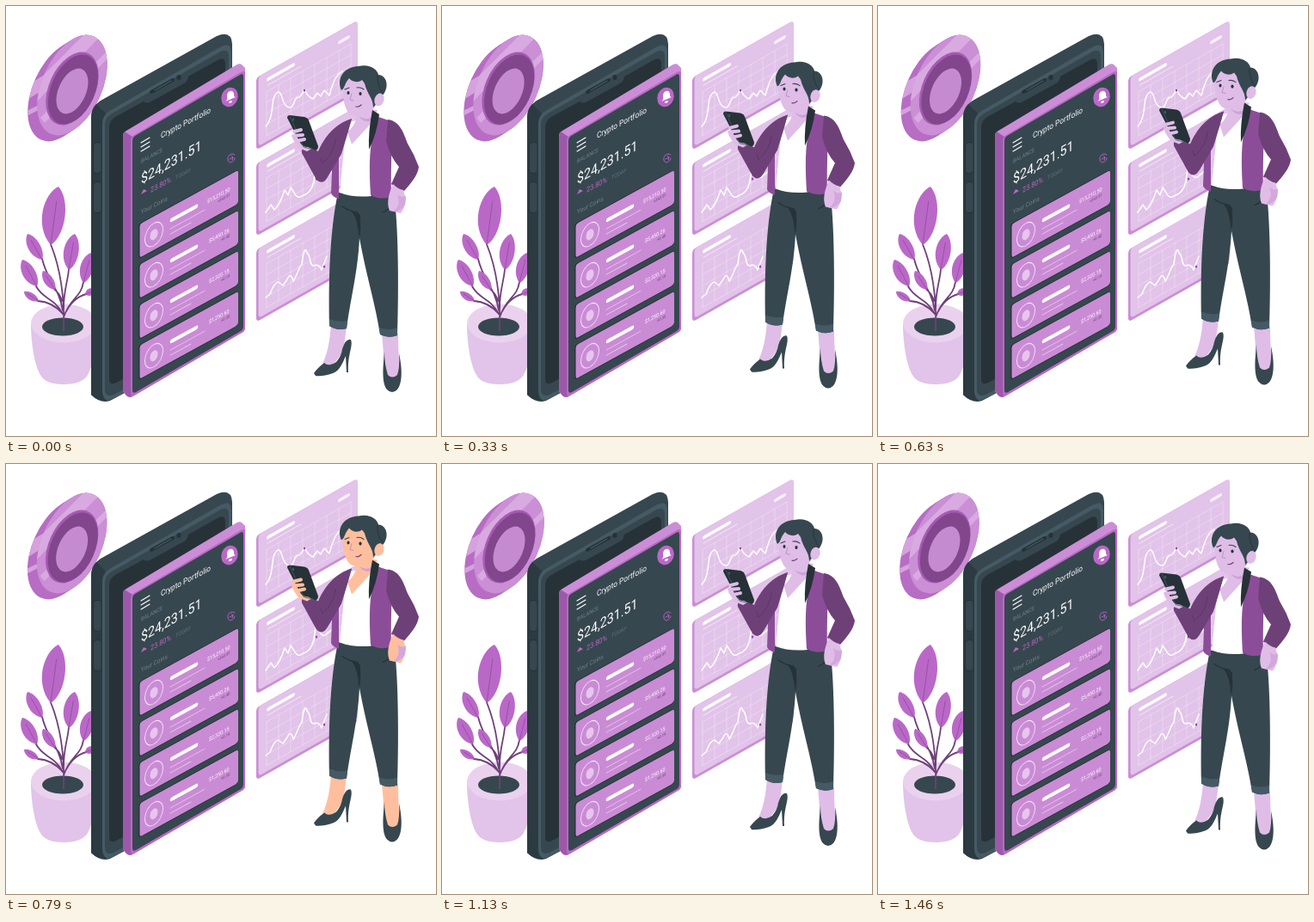
Animation of 500 by 500 pixels, one loop 1.5 s. Source, as an HTML page with a canvas:

```html
<!DOCTYPE html>
<html lang="en">
<head>
<meta charset="utf-8">
<title>Crypto Portfolio</title>
<style>
html, body { margin: 0; width: 100%; height: 100%; overflow: hidden; background: #fff; }
canvas { display: block; width: 500px; height: 500px; }
</style>
</head>
<body>
<canvas id="stage" width="500" height="500"></canvas>
<script>
const ctx = document.getElementById('stage').getContext('2d');
const LOOP = 1500;
const DARK = '#37474f', SLATE = '#455a64', NIGHT = '#263238';
const PURPLE = '#ba68c8', LILAC = '#cc8dd7', PALE = '#e2c3e9';
const PLUM = '#8c4d98', DEEP = '#6e4078';

ctx.lineCap = ctx.lineJoin = 'round';

function fill(path, color) {
  ctx.fillStyle = color;
  ctx.fill(new Path2D(path));
}
function line(path, color, width = 1) {
  ctx.strokeStyle = color;
  ctx.lineWidth = width;
  ctx.stroke(new Path2D(path));
}
function oval(x, y, rx, ry, color, angle = 0) {
  ctx.beginPath();
  ctx.ellipse(x, y, rx, ry, angle, 0, 2 * Math.PI);
  ctx.fillStyle = color;
  ctx.fill();
}
function box(x, y, w, h, r, color) {
  ctx.beginPath();
  ctx.roundRect(x, y, w, h, r);
  ctx.fillStyle = color;
  ctx.fill();
}
// Draws in a plane whose horizontal axis climbs to the right.
function onPlane(x, y, slope, draw) {
  ctx.save();
  ctx.transform(1, -slope, 0, 1, x, y);
  draw();
  ctx.restore();
}
function label(text, x, y, size, color, slope = 0, weight = 400) {
  ctx.save();
  ctx.transform(0.866, -0.866 * slope, 0, 1, x, y);
  ctx.font = `${weight} ${size}px Roboto, sans-serif`;
  ctx.fillStyle = color;
  ctx.fillText(text, 0, 0);
  ctx.restore();
}

function chart(y, curve, dotX, dotY) {
  onPlane(291, y, 0.567, () => {
    box(0, 0, 117, 84, 4, LILAC);
    box(2.5, 0, 115.5, 81, 4, PALE);
    ctx.globalAlpha = 0.38;
    for (let x = 12; x < 112; x += 14) line(`M${x} 23V74`, '#fff', 0.7);
    for (let h = 23; h < 78; h += 12.7) line(`M12 ${h}H110`, '#fff', 0.7);
    ctx.globalAlpha = 1;
    line('M14 9.5H43', '#fff', 4);
    line('M13 16H52', '#f5e8f7', 1);
    line('M97 13.5H107', '#f8effa', 4);
  });
  line(curve, '#fff', 1.5);
  oval(dotX, dotY, 1.2, 1.5, PLUM);
}

function charts() {
  chart(83.5, 'M302 140Q306 136 308 128C311 115 309 103 317 100C322 100 320 118 331 118C336 116 334 106 341 106Q344 104 347 97Q350 105 357 108L362 101 366 105 370 98 376 104Q381 85 386 80L391 76', 347, 98);
  chart(183.5, 'M302 240L308 231 312 237Q318 232 324 214L328 220 331 211 335 217Q339 225 344 221C351 219 356 214 358 204Q360 186 363 188Q365 201 371 199L382 190', 361, 201);
  chart(283.5, 'M302 339L307 335Q312 321 317 321L322 325 327 318Q331 308 334 320C339 312 341 303 344 300Q347 276 350 287C355 290 352 302 358 302Q364 299 367 307L373 291', 370, 303);
}

function coin(shift) {
  ctx.save();
  ctx.translate(shift, 0);
  const tilt = 0.42;
  const rim = new Path2D();
  for (let i = 0; i <= 10; i++) rim.ellipse(66 + 1.1 * i, 99 - 0.7 * i, 35, 62, tilt, 0, 2 * Math.PI);
  ctx.fillStyle = '#b76dc4';
  ctx.fill(rim);
  ctx.save();
  ctx.clip(rim);
  fill('M20 95L48 78 58 88 20 112ZM20 124L55 107 55 112 20 130Z', '#d5a2dd');
  oval(77, 92, 35, 62, '#ca8fd5', tilt);
  ctx.beginPath();
  ctx.ellipse(77, 92, 35, 62, tilt, 0, 2 * Math.PI);
  ctx.clip();
  fill('M34 90L94 30 111 34 34 113ZM40 130L122 48V57L45 136Z', '#d9aae1');
  ctx.restore();
  oval(77, 96, 27, 45, '#a65ab3', tilt);
  oval(78, 97, 25.5, 43, '#81468c', tilt);
  oval(77, 99, 16, 28, '#c58bd0', tilt);
  ctx.restore();
}

function leaf(x, y, tipX, tipY, spread) {
  const dx = tipX - x, dy = tipY - y, len = Math.hypot(dx, dy);
  const nx = -dy / len * spread, ny = dx / len * spread;
  const at = (k, side) => `${x + dx * k + nx * side} ${y + dy * k + ny * side}`;
  fill(`M${x} ${y}C${at(0.2, 1)} ${at(0.8, 1)} ${tipX} ${tipY}C${at(0.85, -1)} ${at(0.3, -1.4)} ${x} ${y}Z`, PURPLE);
  line(`M${x} ${y}L${at(0.75, 0)}`, PLUM, 0.8);
}

function plant() {
  fill('M29 368C29 392 33 417 40 429Q46 440 67 440Q88 440 95 429C102 417 105 392 105 368Z', PALE);
  oval(67, 369, 38, 22.5, '#ead2ef');
  oval(66, 373, 24, 10.5, DARK);
  line('M67 377C68 347 66 312 52 277M66 354C62 328 48 320 42 294M66 358C55 338 44 342 35 326M66 358Q54 344 37 343M65 343Q63 335 56 329M67 352C67 330 72 320 73 306M67 362C75 338 87 340 90 321M70 355Q80 336 99 334', DEEP, 1.8);
  leaf(52, 278, 61, 210, 16);
  leaf(42, 295, 25, 265, 8.5);
  leaf(36, 326, 19, 295, 9);
  leaf(38, 343, 21, 332, 5);
  leaf(57, 330, 43, 308, 6.5);
  leaf(73, 307, 80, 265, 10.5);
  leaf(90, 322, 99, 287, 9);
  leaf(92, 335, 104, 331, 5);
}

function phone() {
  fill('M99 130Q99 117 110 110L245 35Q262 28 263 44V383L121 459Q110 463 99 452Z', DARK);
  fill('M99 130Q99 120 105 114L116 125V459Q106 459 99 452Z', '#2c3a41');
  fill('M112 135Q113 126 122 121L247 49Q262 40 262 54V383L124 457Q113 462 112 448Z', SLATE);
  fill('M115 138Q115 130 123 125L246 55Q259 47 259 59V380L125 452Q115 456 115 445Z', DARK);
  fill('M120 142Q120 133 127 129L160 111Q163 114 169 111L207 90Q211 88 212 82L244 64Q255 57 255 68V370L128 438Q120 442 120 433Z', NIGHT);
  line('M169 100L194 86', NIGHT, 4);
  line('M173 98L192 87', SLATE, 1.2);
  oval(201, 83, 2.6, 3, NIGHT);
  for (const [y, h] of [[158, 37], [204, 37]]) {
    box(101, y, 10, h, 5, NIGHT);
    box(102, y + 1, 8.5, h - 2, 4, DARK);
  }
}

function card(row, price, change) {
  onPlane(155, 254 + 47 * row, 0.55, () => {
    box(-1, -1, 116, 41, 4, NIGHT);
    box(0.5, 0, 114.5, 39, 3, '#ca8bd5');
    ctx.beginPath();
    ctx.ellipse(17, 21, 10.5, 13, 0, 0, 2 * Math.PI);
    ctx.strokeStyle = '#f4e6f7';
    ctx.lineWidth = 0.9;
    ctx.stroke();
    oval(17, 21, 4.5, 6, '#e6c6ec');
    line('M38 15.5H66', '#fff', 4.5);
    line('M36 25H76M36 31H60', '#ead1ef', 0.8);
    label(price, price.length > 9 ? 79 : 81, 19, 6.2, '#fff');
    label(change, change.length > 5 ? 91 : 95, 25, 4.7, DEEP);
  });
}

function panel() {
  fill('M136 151Q136 147 140 145L267 69Q271 66 274 68L278 72V374Q278 378 274 380L149 453Q144 457 140 453L136 448Z', LILAC);
  fill('M136 151Q136 148 138 146L147 152V454Q143 456 140 453L136 448Z', '#9c59a9');
  fill('M145 156Q145 152 149 150L273 77Q278 74 278 79V374Q278 378 274 380L149 453Q145 455 145 450Z', PURPLE);
  fill('M147 157Q147 153 150 151L273 79.5Q276 78 276 82V372Q276 376 273 378L151 449Q147 451 147 447Z', DARK);

  line('M157 159L167 153M157 164L167 158M157 169L167 163', '#fff', 1.1);
  label('Crypto Portfolio', 180, 154, 9.5, '#fff', 0.52);
  oval(260, 106, 9.5, 11.5, PURPLE, 0.35);
  fill('M255 111Q258 109 257 105C257 101 259 99 261 99C264 98 265 101 265 103Q265 106 267 106Z', '#fff');
  line('M260 112L262 111', '#fff', 2);

  label('BALANCE', 157, 183, 6.6, '#71808a', 0.55);
  label('$24,231.51', 157, 207, 16.4, '#fff', 0.57);
  fill('M157 219L160 213 164 215Z', PURPLE);
  label('23.80%', 168, 217, 8.5, PURPLE, 0.53);
  label('TODAY', 197, 202, 6.5, '#61717a', 0.53);
  label('Your Coins', 157, 242, 7.4, '#71808a', 0.52);
  line('M266 173C262 170 257 174 258 179C259 184 265 182 266 177M260 178L264 176 262 174M264 176L263 179', PURPLE, 0.9);

  card(0, '$15,210.50', '+343.81');
  card(1, '$5,450.26', '+6.40');
  card(2, '$2,320.15', '+0.19');
  card(3, '$1,250.60', '+0.35');
}

function legs(skin) {
  fill('M378 370L396 372Q394 392 391 403L380 418 368 416Q376 400 378 370Z', skin);
  fill('M437 380L456 381Q456 410 459 429L449 434 441 429Z', skin);
  fill('M358 427Q362 421 370 415Q376 420 384 414Q390 407 391 399Q395 386 401 388C404 396 397 404 398 426H396L395 407C391 416 388 424 380 427Q368 431 360 430Z', DARK);
  fill('M440 402C439 415 436 438 443 446Q449 452 455 446C461 439 461 422 457 404Q458 421 455 429Q449 434 444 429Q440 416 440 402Z', DARK);
  fill('M386 217L451 219C456 252 457 320 455 383Q445 387 435 382C430 348 420 318 411 270C409 310 401 338 396 375Q385 378 376 372C375 322 376 264 386 217Z', DARK);
  fill('M376 364Q386 368 397 366L396 375Q385 378 376 372ZM434 374Q445 378 455 374V383Q445 387 435 382Z', SLATE);
  line('M391 233Q399 239 409 240Q413 249 411 266M438 240Q446 237 450 229', NIGHT, 1.3);
  fill('M401 237L412 243 410 269Q410 249 401 237Z', NIGHT);
}

function torso(skin) {
  fill('M396 136L426 128 425 221Q403 223 388 217Z', '#fff');
  fill('M409 119L432 121 424 137 402 161 397 146Q408 139 409 119Z', skin);
  fill('M410 128Q418 134 426 129L423 134Q416 136 410 128Z', '#cda3d7');
  fill('M402 131L396 151 387 176 387 224Q381 223 378 218L380 165Q383 139 402 131Z', PLUM);
  fill('M402 131C382 137 370 153 363 169L348 161Q343 166 344 171L361 202Q368 209 374 199L390 172 397 149Z', DEEP);
  line('M383 155Q382 171 368 183L366 177', '#5e3568', 1);
  fill('M430 128L445 133C451 150 447 175 448 222Q435 226 424 220Q421 175 426 153Z', PLUM);
  fill('M444 132C459 134 463 150 467 160Q475 173 480 187C479 197 470 207 463 215Q453 213 448 207L457 187Q447 176 442 157Z', DEEP);
  fill('M426 121L434 126Q431 149 422 167Q421 146 426 121Z', NIGHT);
  fill('M450 207Q456 213 462 214L465 224Q464 235 459 241L446 238Q441 227 450 207Z', skin);
  fill('M455 219Q460 224 465 221L464 231Q458 240 450 239Q460 232 455 219Z', '#d3a7dd');
}

function head(skin) {
  fill('M391 92C392 105 392 117 399 125Q408 132 420 126Q431 120 434 102L428 81 395 80Z', skin);
  fill('M390 98C384 85 392 71 410 70C423 67 432 74 433 80C443 81 445 93 440 101C437 107 432 104 432 112L427 118C427 107 420 103 417 90L414 86C409 90 402 88 399 84C393 91 394 96 390 98Z', DARK);
  oval(434, 109, 5.5, 7.5, skin, 0.3);
  line('M432 81Q431 92 438 101', NIGHT, 0.8);
  line('M394 97L399 95M408 95Q412 94 416 97', DARK, 1.1);
  oval(398, 101, 1.5, 2, NIGHT);
  oval(412, 102, 1.6, 2.1, NIGHT);
  line('M402 102L400 109 404 110', '#b982c5', 0.8);
  line('M407 117Q410 118 413 115', DEEP, 1.2);
}

function handset(skin) {
  fill('M345 142Q334 143 335 149L333 154 340 165 350 169 359 164 356 151Z', skin);
  fill('M327 130Q327 127 330 127L347 129Q351 130 352 133L363 163Q363 167 360 168L351 164Q345 164 342 159Z', NIGHT);
  line('M330 128L346 164 358 167', SLATE, 0.8);
  oval(334, 132, 1.2, 1.8, SLATE);
  line('M335 146L343 144M334 151L345 150M338 157L347 155', skin, 4);
}

function woman(lift, skin) {
  ctx.save();
  ctx.translate(0, lift);
  legs(skin);
  torso(skin);
  head(skin);
  handset(skin);
  ctx.restore();
}

// CSS-like "ease" curve, solved by bisection.
function ease(x) {
  const bezier = (s, a, b) => 3 * (1 - s) ** 2 * s * a + 3 * (1 - s) * s * s * b + s ** 3;
  let lo = 0, hi = 1;
  for (let i = 0; i < 20; i++) {
    const mid = (lo + hi) / 2;
    if (bezier(mid, 0.25, 0.25) < x) lo = mid; else hi = mid;
  }
  return bezier(lo, 0.1, 1);
}
const SHAKE = [0, -1, 2, -4, 4, -4, 4, -4, 2, -1, 0];
function shake(phase) {
  const step = phase * 10, i = Math.floor(step);
  return SHAKE[i] + (SHAKE[i + 1] - SHAKE[i]) * ease(step - i);
}

function render(now) {
  const time = now % LOOP, phase = time / LOOP;
  const lift = -10 * (1 - Math.abs(1 - 2 * phase));
  const skin = time >= 710 && time < 870 ? '#ffbf9f' : '#dfbde7';
  ctx.fillStyle = '#fff';
  ctx.fillRect(0, 0, 500, 500);
  charts();
  coin(shake(phase));
  plant();
  phone();
  panel();
  woman(lift, skin);
}

function tick() {
  render(performance.now());
  requestAnimationFrame(tick);
}
tick();
</script>
</body>
</html>
```
